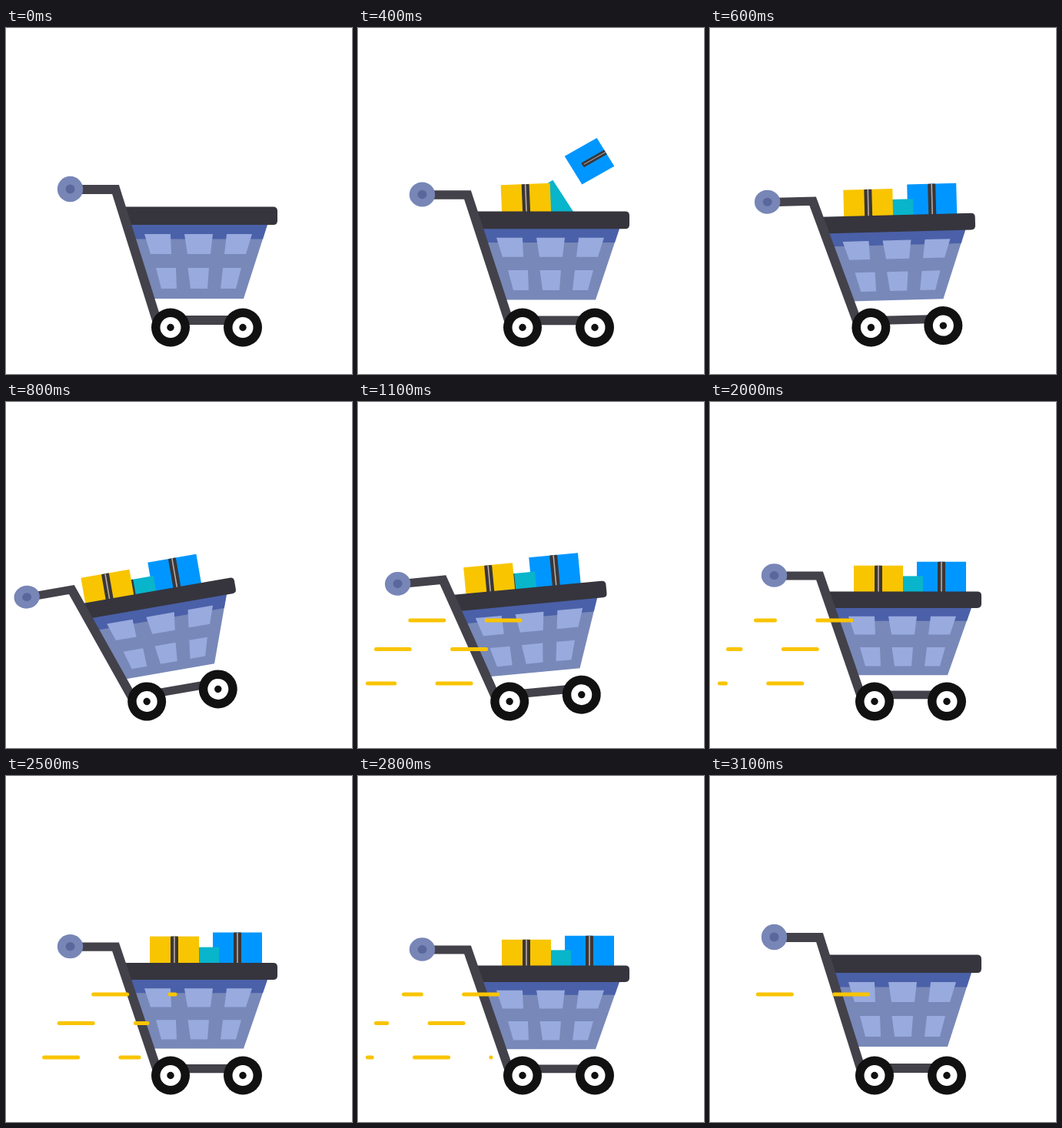
Write an HTML page that moves like this. It is 450 by 450 pixels and loops after 3200 ms.

```html
<!DOCTYPE html>
<html lang="en">
<head>
<meta charset="utf-8">
<title>Shopping cart</title>
<style>
  html, body { margin: 0; width: 100%; height: 100%; overflow: hidden; background: #fff; }
  svg { display: block; width: 100%; height: 100%; }

  .cart, .slide, .squash, .load, .spin, .streaks line {
    animation: 3200ms linear infinite both;
  }
  .cart { transform-origin: 214px 389.5px; animation-name: lean; }
  .slide { animation-name: slide; }
  .lean-ease { animation-timing-function: cubic-bezier(.455, .03, .515, .955); }
  .squash {
    transform-origin: 214px 389.5px;
    animation-name: squash;
    animation-timing-function: ease-in-out;
  }
  .load { animation-name: load; animation-timing-function: step-end; }
  .spin {
    transform-box: fill-box;
    transform-origin: center;
    animation-name: fall, turn, grow;
    animation-delay: var(--delay);
  }
  .streaks line {
    stroke: #f9c400;
    stroke-width: 5;
    stroke-linecap: round;
    stroke-dasharray: 44 55.3;
    animation-name: stream, blow;
    animation-timing-function: linear, step-end;
    animation-delay: var(--delay);
  }

  @keyframes lean {
    0%, 15.625%, 40.625%, 100% { translate: 0 0; rotate: 0deg; }
    28.125% { translate: -35px 0; rotate: -11.2deg; }
  }
  @keyframes slide {
    0%, 15.625%, 40.625%, 100% { translate: 0 0; }
    28.125% { translate: var(--slide) 0; }
  }
  @keyframes squash {
    0%, 4.7%, 96.875%, 100% { scale: 1 1; }
    12.5% { scale: 1 .961; }
    25% { scale: 1 .892; }
    31.25% { scale: 1 .935; }
    37.5%, 50%, 62.5%, 75%, 87.5% { scale: 1 .911; }
    43.75%, 56.25%, 68.75%, 81.25% { scale: 1 .953; }
    93.75% { scale: 1 .962; }
  }
  @keyframes load {
    0%, 95.3% { visibility: hidden; }
    4.2% { visibility: visible; }
    100% { visibility: hidden; }
  }
  @keyframes fall {
    0%, 4.375% { translate: 0 -120px; animation-timing-function: cubic-bezier(.645, .045, .355, 1); }
    12.5%, 100% { translate: 0 0; }
  }
  @keyframes turn {
    0% { rotate: var(--turn); }
    12.5%, 100% { rotate: 0deg; }
  }
  @keyframes grow {
    0%, 3.5% { scale: 0; }
    10.5%, 100% { scale: 1; }
  }
  @keyframes stream {
    from { stroke-dashoffset: 13.2px; }
    to { stroke-dashoffset: 816.4px; }
  }
  @keyframes blow {
    0%, 97.5%, 100% { visibility: hidden; }
    32.3% { visibility: visible; }
  }
</style>
</head>
<body>
<svg viewBox="0 0 450 450">
  <defs>
    <g id="box">
      <rect width="64" height="70"/>
      <rect x="27" width="10" height="50" rx="1" fill="#3a3739"/>
      <rect x="31.2" width="1.6" height="47" fill="#b8aca6"/>
    </g>
    <g id="wheel">
      <circle r="25" fill="#111"/>
      <circle r="13.5" fill="#fff"/>
      <circle r="4.7" fill="#111"/>
    </g>
  </defs>

  <g class="cart lean-ease">
    <g class="squash">
      <g class="load">
        <g class="slide lean-ease" style="--slide: -26px">
          <g class="spin" style="--turn: 180deg; --delay: 133ms"><use href="#box" x="269" y="190" fill="#0096ff"/></g>
        </g>
        <g class="slide lean-ease" style="--slide: -30px">
          <g class="spin" style="--turn: -180deg; --delay: 72ms"><use href="#box" x="213" y="210.5" fill="#08b5cb"/></g>
        </g>
        <g class="slide lean-ease" style="--slide: -34px">
          <g class="spin" style="--turn: -180deg; --delay: 6ms"><use href="#box" x="187" y="195.5" fill="#f8c500"/></g>
        </g>
      </g>

      <!-- basket -->
      <path d="M160 254H340.5L309 352H188Z" fill="#7888b8"/>
      <path d="M160 254H340.5L334 274.5H166Z" fill="#4a60a8"/>
      <path fill="#98aade" d="M180 268H214L215 294H188Z M232 268H269L266 294H236Z M287 268H320L312 294H284Z
        M195 312H221L222 339H202Z M236.500 312H264L262 339H240Z M282 312H306L299 339H279Z"/>
      <path d="M152 232.500H347.500Q353 232.500 353 238V250.500Q353 256 347.500 256H152Z" fill="#36353d"/>

      <!-- frame and handle -->
      <path d="M96 210H142.500L196 380H300" fill="none" stroke="#43424a" stroke-width="12"/>
      <circle cx="83.500" cy="209.500" r="16.700" fill="#7786b6"/>
      <circle cx="83.500" cy="209.500" r="6" fill="#59689c"/>
    </g>
    <use href="#wheel" x="214" y="389.500"/>
    <use href="#wheel" x="308" y="389.500"/>
  </g>

  <g class="streaks">
    <line x1="59.500" x2="220" y1="284" y2="284" style="--delay: 0ms"/>
    <line x1="23.500" x2="184" y1="321.500" y2="321.500" style="--delay: -34ms"/>
    <line x1="12.500" x2="173" y1="366" y2="366" style="--delay: -68ms"/>
  </g>
</svg>
</body>
</html>
```
